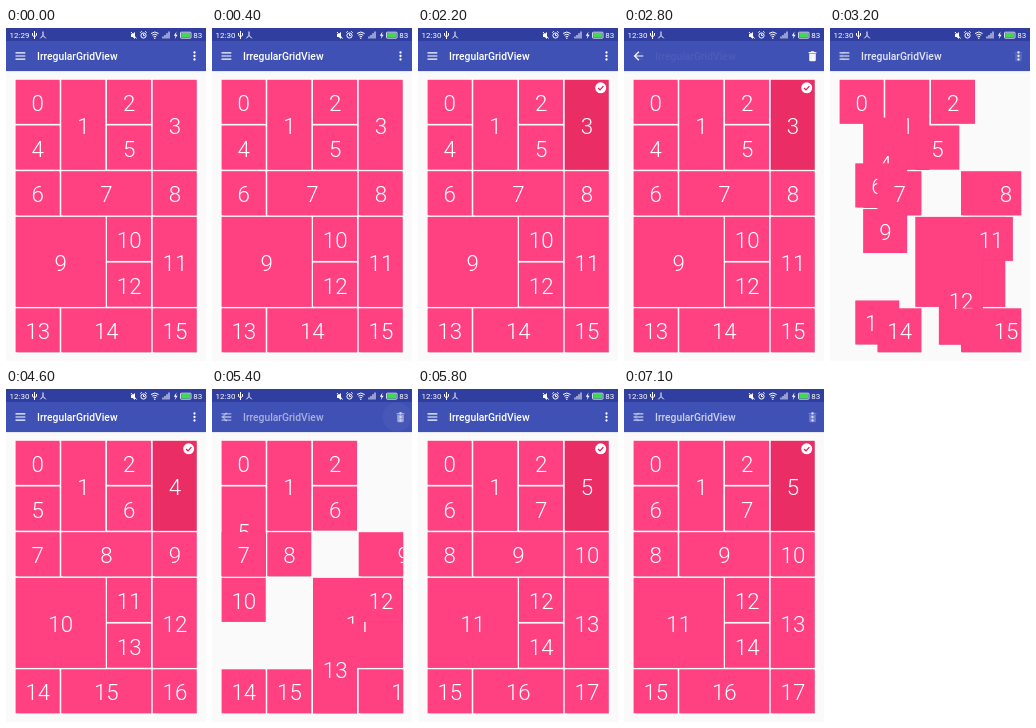
Recreate the animation shown at these times as an HTML page. Size 200 by 333 pixels, loop 7200 ms.

```html
<!DOCTYPE html>
<html lang="en">
<head>
<meta charset="utf-8">
<title>IrregularGridView</title>
<style>
  html, body { margin: 0; width: 100%; height: 100%; overflow: hidden; background: #fafafa; }
  body { position: relative; font-family: Roboto, sans-serif; }
  #bar {
    position: absolute; left: 0; top: 0; width: 200px; height: 43px;
    background: linear-gradient(#303f9f 13.4px, #3f51b5 13.4px);
    box-shadow: 0 .5px 1.5px rgba(0, 0, 0, .2);
  }
  #bar svg { display: block; width: 200px; height: 43px; }
  #grid { position: absolute; inset: 0; clip-path: inset(51px 8.7px 8.3px 9px); }
  .tile {
    position: absolute; left: 0; top: 0; display: flex;
    align-items: center; justify-content: center;
    box-sizing: border-box; padding: 1.5px 0 0 .5px;
    background: #ff4081; color: #fff; font-size: 22.3px; font-weight: 300;
    box-shadow: 0 .3px 1px rgba(0, 0, 0, .18);
  }
  .tile svg { position: absolute; right: 2.4px; top: 1.6px; width: 12px; height: 12px; display: none; }
  .tile.on { background: #eb2d66; }
  .tile.on svg { display: block; }
</style>
</head>
<body>
<div id="grid"></div>
<div id="bar">
  <svg viewBox="0 0 200 43" fill="#fff" font-family="Roboto, sans-serif">
    <!-- status bar -->
    <g font-size="8">
      <text id="clock" x="3.5" y="10">12:29</text>
      <text x="187.3" y="9.8">83</text>
    </g>
    <g fill="none" stroke="#fff">
      <path d="M28.5 3v8M26.5 5v2.5l2 1.2 2-1.2V5M37 3.5v4l-2.6 2.8M37 7.5l2.8 2.8"/>
      <circle cx="137.5" cy="7.5" r="2.6"/>
      <path d="M137.5 5.8v1.8h1.4M134.3 4.6l1.5-1.3M140.7 4.6l-1.5-1.3"/>
      <path d="M145 5.5q3.8-3 7.6 0M146.3 7.2q2.5-2 5 0M147.5 8.8q1.3-1 2.6 0"/>
      <path d="M157 10.5v-2M159 10.5V7M161 10.5V5.2M163 10.5V3.5"/>
      <path d="M125 4l5.5 6.5"/>
      <rect x="174.5" y="4.2" width="10.5" height="6" rx=".8" stroke-width=".8"/>
    </g>
    <path d="M125 6h1.6l2.4-2v7l-2.4-2H125zM170.6 3.5l-2.8 4.2h1.8l-.8 3.3 2.8-4.3h-1.8z"/>
    <rect x="175.2" y="4.9" width="9" height="4.6" fill="#43d854"/>
    <circle cx="148.8" cy="10.3" r=".7"/>
    <!-- toolbar -->
    <g id="normal">
      <path d="M9.5 24.2h9.8v1.2H9.5zM9.5 27.4h9.8v1.2H9.5zM9.5 30.6h9.8v1.2H9.5z"/>
      <text x="31" y="31.6" font-size="10.3" font-weight="500">IrregularGridView</text>
      <circle cx="188.5" cy="24.5" r="1.15"/>
      <circle cx="188.5" cy="28" r="1.15"/>
      <circle cx="188.5" cy="31.5" r="1.15"/>
    </g>
    <circle id="ripple" cx="185" cy="28" r="14.5" opacity="0"/>
    <g id="action" opacity="0">
      <path d="M19.3 27.4h-7.2l3.2-3.2-.9-.9-4.8 4.7 4.8 4.7.9-.9-3.2-3.2h7.2z"/>
      <path d="M184.6 24h2l.6-.7h2.6l.6.7h2v1.2h-7.8zM185.2 25.8h6.6v6.2q0 1.2-1.2 1.2h-4.2q-1.2 0-1.2-1.2z"/>
    </g>
  </svg>
</div>
<script>
const LOOP = 7200;
const PITCH = 45.7, GAP = 1.8, LEFT = 9.6, TOP = 51.8;
const FADE = 120, MOVE = 250;
const removals = [3013, 5280];       // the tile in slot 3 is deleted
const picks = [2200, 4600, 5800];    // the tile in slot 3 is selected
const barStarts = [2200, 4600, 6780];

// column, row, column span, row span
const slots = [
  [0, 0, 1, 1], [1, 0, 1, 2], [2, 0, 1, 1], [3, 0, 1, 2],
  [0, 1, 1, 1], [2, 1, 1, 1], [0, 2, 1, 1], [1, 2, 2, 1],
  [3, 2, 1, 1], [0, 3, 2, 2], [2, 3, 1, 1], [3, 3, 1, 2],
  [2, 4, 1, 1], [0, 5, 1, 1], [1, 5, 2, 1], [3, 5, 1, 1]
];
const LAST = slots.length - 1;

const $ = id => document.getElementById(id);
const clamp = v => Math.min(1, Math.max(0, v));
const ease = v => (1 - Math.cos(Math.PI * clamp(v))) / 2;
const mix = (a, b, p) => a + (b - a) * p;

const check = `<svg viewBox="0 0 12 12"><circle cx="6" cy="6" r="5.5" fill="#fff"/>
  <path d="M3.4 6.2l1.9 1.9 3.4-3.8" fill="none" stroke="#d81b60" stroke-width="1.2"/></svg>`;

const tiles = Array.from({ length: slots.length + removals.length }, (_, i) => {
  const el = document.createElement('div');
  el.className = 'tile';
  el.innerHTML = i + check;
  $('grid').append(el);
  return el;
});

const slotOf = (i, gone) => i < 3 ? i : i - gone;

function place(el, from, to, p) {
  const [c, r, w, h] = slots[to];
  const x = LEFT + PITCH * mix(slots[from][0], c, p);
  const y = TOP + PITCH * mix(slots[from][1], r, p);
  el.style.width = PITCH * w - GAP + 'px';
  el.style.height = PITCH * h - GAP + 'px';
  el.style.transform = `translate(${x}px, ${y}px)`;
}

function draw(t) {
  const gone = removals.filter(d => t >= d).length;
  const since = gone ? t - removals[gone - 1] : Infinity;
  const p = gone ? ease((since - FADE) / MOVE) : 1;

  tiles.forEach((el, i) => {
    const to = slotOf(i, gone);
    const from = gone ? slotOf(i, gone - 1) : to;
    const leaving = i === gone + 2 && gone > 0;
    let alpha = 1;
    if (leaving) {
      alpha = 1 - clamp(since / FADE);
      place(el, 3, 3, 1);
    } else if (to > LAST || (i >= 3 && to < 3)) {
      alpha = 0;
    } else if (from > LAST) {
      alpha = clamp((since - FADE - MOVE) / FADE);
      place(el, to, to, 1);
    } else {
      place(el, from, to, p);
    }
    el.style.opacity = alpha;
    el.style.visibility = alpha ? 'visible' : 'hidden';
    el.classList.toggle('on', leaving || (i === gone + 3 && t >= picks[gone]));
  });

  const shown = clamp((t - barStarts[gone]) / 620) ** 2;
  const a = Math.max(shown, gone ? 1 - clamp(since / 220) : 0);
  $('normal').setAttribute('opacity', 1 - a);
  $('action').setAttribute('opacity', a);
  $('ripple').setAttribute('opacity', gone ? .08 * (1 - clamp((since - 60) / 120)) : 0);
  $('clock').textContent = t < 100 ? '12:29' : '12:30';
}

function tick() {
  draw(performance.now() % LOOP);
  requestAnimationFrame(tick);
}
tick();
</script>
</body>
</html>
```
